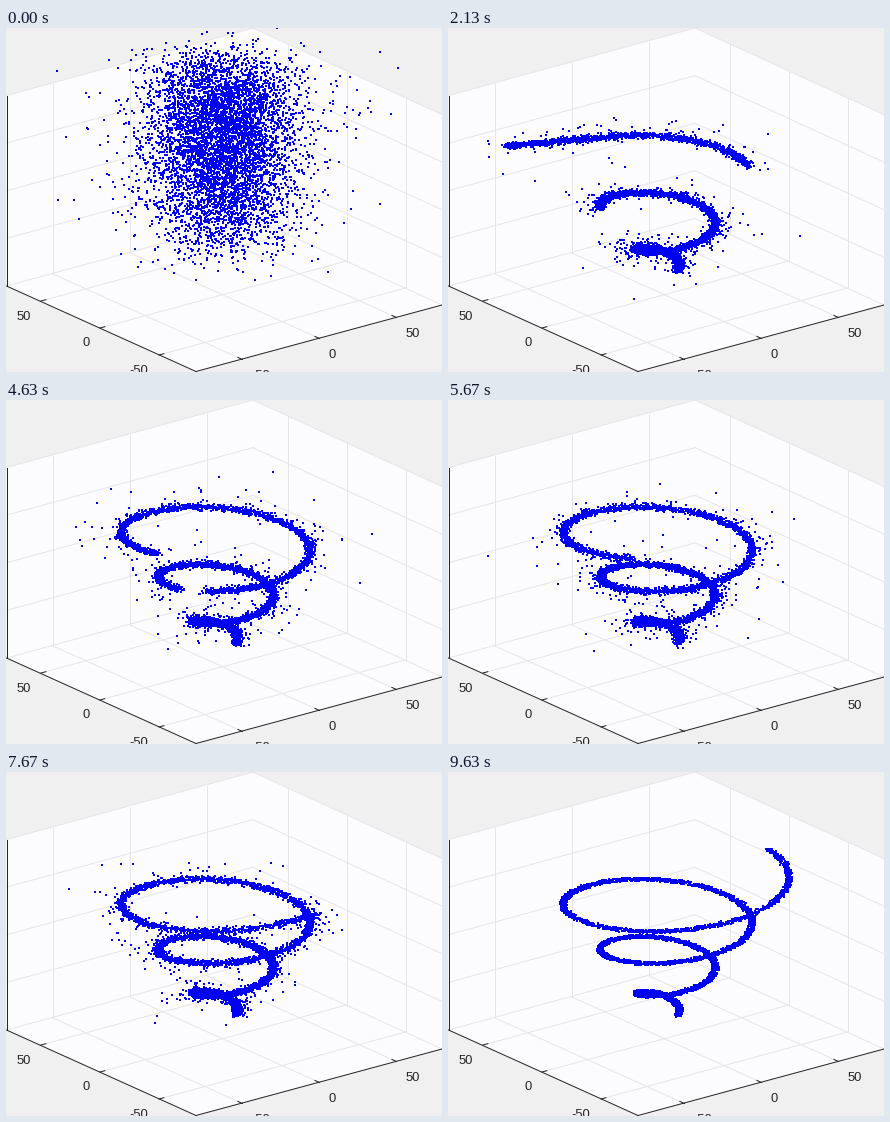
Write a matplotlib script that moves like this. It is 436 by 344 pixels and loops after 9.83 s.

```python
import numpy as np
import matplotlib.pyplot as plt
from matplotlib.animation import FuncAnimation

W, H, DPI = 436, 344, 100
LOOP, FRAMES = 9830, 150
STEP = LOOP / FRAMES
N = 6500
PI = np.pi
END = 6.2 * PI
SETTLED = 9.56  # seconds; from here on the spiral is clean

PAPER, WALL, GRID, INK, DOT = "#f0f0f0", "#fcfcff", "#e6e6ea", "#262626", "#0000f4"


def px(size):
    return size * 72 / DPI


def ramp(t, start, length):
    return np.clip((t - start) / length, 0, 1)


def spiral(a, out=0):
    """Conical helix projected to the stage, pushed outward by out."""
    r = 11 + 37 * a / (2 * PI) + out
    x = 219 + r * np.cos(a)
    y = 243 - 45 * a / (2 * PI) - 0.353 * r * np.sin(a)
    return np.array([x, y])


def tip_angle(t):
    """The known end grows steadily, with a slow swing."""
    s = ramp(t, 2.13, 7.5)
    return PI * (4.66 + 1.54 * s + 0.14 * np.sin(2 * PI * s))


def overshoot(t):
    """Length of the straight run past the end: one decay, one late burst."""
    late = ramp(t, 7, 2.6)
    return 170 * (1 - ramp(t, 0, 3.7) ** 2) + 75 * np.sin(PI * late) * (1 - late)


def gap(t):
    """Stretch of the lower ring that is still missing."""
    x = ramp(t, 1.8, 3.4)
    x = x * x * (3 - 2 * x)
    return PI * (3.1 + 0.25 * x ** 3), PI * (4.14 - 0.79 * x)


def learned(u, t, out):
    """Place u in 0..1 on the parts of the spiral known at time t."""
    tip, (lo, hi) = tip_angle(t), gap(t)
    s = u * (lo + tip - hi + overshoot(t) / 75)
    a = np.where(s < lo, s, s + hi - lo)
    beyond = np.maximum(a - tip, 0) * 75
    tangent = spiral(tip + 1e-3) - spiral(tip)
    tangent /= np.hypot(*tangent)
    return spiral(np.minimum(a, tip), out) + tangent[:, None] * beyond


# Starting cloud, ordered so that its bottom feeds the start of the spiral
base = np.random.default_rng(4)
U = np.linspace(0, 1, N)
spread = np.where(base.random(N) < 0.05, 68, 36)
depth = np.sort(base.beta(1.6, 2.2, N))[::-1]
CLOUD = np.array([
    217 + spread * base.normal(size=N),
    30 + 205 * depth + 0.36 * spread * base.normal(size=N),
])


def points(i):
    t = i * STEP / 1000
    rng = np.random.default_rng(100 + i)
    if t >= SETTLED:
        return spiral(U * END) + rng.uniform(-1, 1, (2, N)) * [[3.4], [1.8]]
    stray = (rng.random(N) < 0.12) * rng.exponential(1, N)
    noise = rng.normal(size=(2, N)) * ([[2.1], [1.5]] + stray * [[4], [4]])
    goal = learned(U, t, 8 * stray) + noise
    mix = 1 - (1 - ramp(t, 0, 1)) ** 2
    return CLOUD + (goal - CLOUD) * mix


fig = plt.figure(figsize=(W / DPI, H / DPI), dpi=DPI, facecolor=PAPER)
ax = fig.add_axes([0, 0, 1, 1])
ax.set_xlim(0, W)
ax.set_ylim(H, 0)
ax.axis("off")


def line(p, q, color):
    ax.plot([p[0], q[0]], [p[1], q[1]], color=color, lw=px(1))


def move(p, d, k=1):
    return p[0] + k * d[0], p[1] + k * d[1]


# Box of the 3-D axes
LEFT, FRONT, RIGHT, BACK = (0.5, 258), (190, 343.5), (436, 277), (247, 190.5)
UP = (0, -190.5)
ax.fill(*zip(LEFT, FRONT, RIGHT, move(RIGHT, UP), move(BACK, UP), move(LEFT, UP)),
        color=WALL, lw=0)

for k in range(5):
    a, b, c = (move(p, UP, k / 4) for p in (LEFT, BACK, RIGHT))
    line(a, b, GRID)
    line(b, c, GRID)


def ticks(zero, step, across, label_at, align):
    """Grid lines, tick marks and labels along one floor edge."""
    for k in (-1, 0, 1):
        p = move(zero, step, k)
        far = move(p, across)
        line(p, far, GRID)
        line(far, move(far, UP), GRID)
        line(p, move(p, across, 5 / np.hypot(*across)), INK)
        x, y = move(p, label_at)
        ax.text(x, y, str(50 * k), color=INK, fontsize=px(13), ha=align,
                va="center_baseline", family="Liberation Sans")


ticks((313.5, 310.5), (77, -21), (-189.5, -85.5), (9, 15), "left")
ticks((94, 300), (-59, -27), (246.5, -67), (-10.5, 14), "right")
line(LEFT, move(LEFT, UP), INK)
line(LEFT, FRONT, INK)
line(FRONT, RIGHT, INK)

dots, = ax.plot([], [], "s", ms=px(2.5), mew=0, color=DOT)


def draw(i):
    dots.set_data(*points(i))
    return dots,


anim = FuncAnimation(fig, draw, frames=FRAMES, init_func=lambda: draw(0),
                     interval=STEP, repeat=True, repeat_delay=0, blit=False)
plt.show()
```
